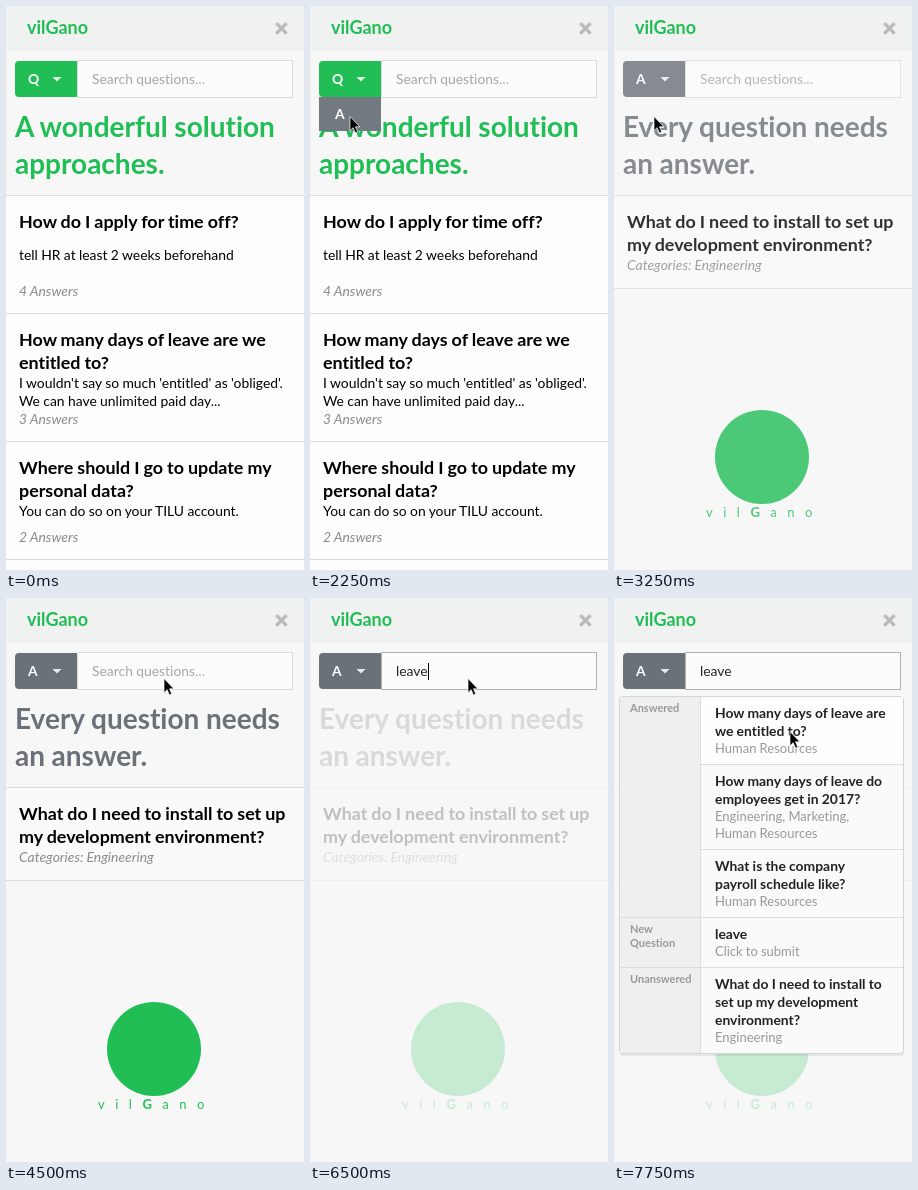
An HTML page for the animation above (8000 ms loop, 298 by 564 pixels).

```html
<!DOCTYPE html>
<html>
<head>
<meta charset="utf-8">
<style>
html, body { margin: 0; width: 100%; height: 100%; overflow: hidden; background: #f7f7f7; }
svg { display: block; font: 13.9px Lato, sans-serif; font-variant-ligatures: none; word-spacing: -.2px; }
.b { font-weight: 700; }
.h1 { font-weight: 700; font-size: 28px; }
.h3 { font-weight: 700; font-size: 17.9px; word-spacing: -.35px; }
.i { font-style: italic; fill: #8a8a8a; }
.cat { font-weight: 700; font-size: 11px; fill: #999; }
.tag { font-size: 13px; fill: #999; }
.white { font-weight: 700; fill: #fff; }
.line { fill: #dcdcdc; }
</style>
</head>
<body>
<svg width="298" height="564" viewBox="0 0 298 564"></svg>
<script>
const LOOP = 8000, GREEN = '#21be56', GREY = '#6a7178';
const svg = document.querySelector('svg');

const text = (x, y, cls, s, extra = '') => `<text x="${x}" y="${y}" class="${cls}" ${extra}>${s}</text>`;
const lines = (x, y, step, cls, rows, extra) => rows.map((s, i) => text(x, y + i * step, cls, s, extra)).join('');
const rect = (x, y, w, h, extra) => `<rect x="${x}" y="${y}" width="${w}" height="${h}" ${extra}/>`;
const rule = y => rect(0, y, 298, 1, 'class="line"');
const group = (id, body) => `<g id="${id}">${body}</g>`;

const button = (letter, color) =>
  `<path d="M71 55H13a4 4 0 0 0-4 4v28a4 4 0 0 0 4 4h58z" fill="${color}"/>` +
  text(22, 78, 'white', letter) + '<path d="M46.5 71h9l-4.5 4.5z" fill="#fff" opacity=".85"/>';

const question = (y, title, body, bodyY, count, countY) =>
  lines(13, y, 23, 'h3', title) + lines(13, bodyY, 18, '', body) + text(13, countY, 'i', count);

const result = (y, title, tags) =>
  lines(101, y, 18, 'b', title, 'fill="#222"') +
  lines(101, y + title.length * 18 - 1, 17, 'tag', tags);

svg.innerHTML =
  rect(0, 0, 298, 45, 'fill="#f0f1f1"') +
  text(21, 28, 'b', 'vilGano', `fill="${GREEN}" style="font-size:18px"`) +
  '<path d="M270.2 17.2l10.4 10.4m0-10.4l-10.4 10.4" stroke="#b7bbbb" stroke-width="3.2"/>' +

  group('ask',
    rect(0, 190, 298, 374, 'fill="#fdfdfd"') +
    lines(9, 130.5, 37, 'h1', ['A wonderful solution', 'approaches.'], `fill="${GREEN}"`) +
    [189, 307, 435, 553].map(rule).join('') +
    question(222, ['How do I apply for time off?'],
      ['tell HR at least 2 weeks beforehand'], 254, '4 Answers', 290) +
    question(340, ['How many days of leave are we', 'entitled to?'],
      ["I wouldn't say so much 'entitled' as 'obliged'.", 'We can have unlimited paid day...'], 382, '3 Answers', 418) +
    question(468, ['Where should I go to update my', 'personal data?'],
      ['You can do so on your TILU account.'], 510, '2 Answers', 536)) +

  group('answer',
    lines(9, 130.5, 37, 'h1', ['Every question needs', 'an answer.'], `fill="${GREY}"`) +
    rect(0, 190, 298, 92, 'fill="#fafafa"') + rule(189) + rule(282) +
    question(222, ['What do I need to install to set up', 'my development environment?'],
      [], 0, 'Categories: Engineering', 264) +
    `<circle cx="148" cy="451" r="47" fill="${GREEN}"/>` +
    text(92, 511, '', 'vil<tspan class="b">G</tspan>ano', `fill="${GREEN}" style="font-size:13px;letter-spacing:10.5px"`)) +

  group('search',
    rect(71.5, 54.5, 215, 37, 'id="box" fill="#fcfcfc"') +
    group('q', button('Q', GREEN)) + group('a', button('A', GREY)) +
    text(86, 77.5, '', '', 'id="entry"') +
    rect(86, 65, 1, 17, 'id="caret"')) +

  group('menu', rect(9, 91, 62, 34, 'fill="#737981"') + text(25, 113, 'white', 'A')) +

  group('results',
    rect(6, 100, 284, 358, 'rx="3" opacity=".07"') +
    rect(5.5, 98.5, 284, 357, 'rx="3" fill="#fafafa" stroke="#d4d4d5"') +
    rect(6, 99, 81, 356, 'fill="#eef0f0"') +
    rect(87, 99, 202, 67, 'id="hover" fill="#fefefe"') +
    rect(86, 99, 1, 356, 'class="line"') +
    [166, 251].map(y => rect(87, y, 202, 1, 'class="line"')).join('') +
    [319, 369].map(y => rect(6, y, 283, 1, 'class="line"')).join('') +
    text(16, 114, 'cat', 'Answered') + lines(16, 335, 14, 'cat', ['New', 'Question']) + text(16, 385, 'cat', 'Unanswered') +
    result(120, ['How many days of leave are', 'we entitled to?'], ['Human Resources']) +
    result(188, ['How many days of leave do', 'employees get in 2017?'], ['Engineering, Marketing,', 'Human Resources']) +
    result(273, ['What is the company', 'payroll schedule like?'], ['Human Resources']) +
    result(341, ['leave'], ['Click to submit']) +
    result(391, ['What do I need to install to', 'set up my development', 'environment?'], ['Engineering'])) +

  '<path id="cursor" d="M1 1.5v14.2l3.2-3 2.2 5.2 2.3-1-2.2-5.1h4.4z" stroke="#fff" stroke-width=".7"/>';

const $ = id => document.getElementById(id);
const show = (id, opacity) => $(id).setAttribute('opacity', +opacity);

// Each track holds a value from its time until the next one.
const hold = (track, t) => track.findLast(k => k[0] <= t).slice(1);
const cursorTrack = [[0, -50, -50], [500, 92, 72], [750, 55, 80], [1000, 49, 80], [1500, 47, 73], [1750, 32, 80],
  [2000, 39, 108], [2250, 39, 109], [4250, 134, 93], [4500, 157, 79], [7500, 169, 112], [7750, 175, 132]];
const fadeTrack = [[0, 0], [3250, .8], [3500, 1], [5000, .85], [5250, .22]];
const caretTrack = [[0, 0], [5000, 1], [5500, 0], [6000, 1], [7250, 0], [7500, 1], [7750, 0]];
const entryTrack = [[0, ''], [6000, 'lea'], [6250, 'leave']];
const popTrack = [[0, 0, 1], [6750, .5, .95], [7000, 1, 1]];

function draw(t) {
  const asking = t < 2750, focused = t >= 5000;
  const [fade] = hold(fadeTrack, t), [entry] = hold(entryTrack, t);
  show('ask', asking);
  show('answer', fade);
  show('search', asking || focused ? 1 : fade);
  show('q', asking);
  show('a', !asking);
  show('menu', t >= 1500 && asking);

  $('box').setAttribute('stroke', focused ? '#b0b2b2' : '#dcdcdc');
  $('entry').textContent = entry || 'Search questions...';
  $('entry').setAttribute('fill', entry ? '#222' : '#a6a6a6');
  show('caret', hold(caretTrack, t)[0]);
  $('caret').setAttribute('x', 86 + (entry ? Math.round($('entry').getComputedTextLength()) : 0));

  const [alpha, scale] = hold(popTrack, t);
  show('results', alpha);
  $('results').setAttribute('transform', `translate(148 277) scale(${scale}) translate(-148 -277)`);
  show('hover', t >= 7750);
  $('cursor').setAttribute('transform', `translate(${hold(cursorTrack, t)})`);
}

function tick(now) {
  draw(now % LOOP);
  requestAnimationFrame(tick);
}
draw(0);
requestAnimationFrame(tick);
</script>
</body>
</html>
```
